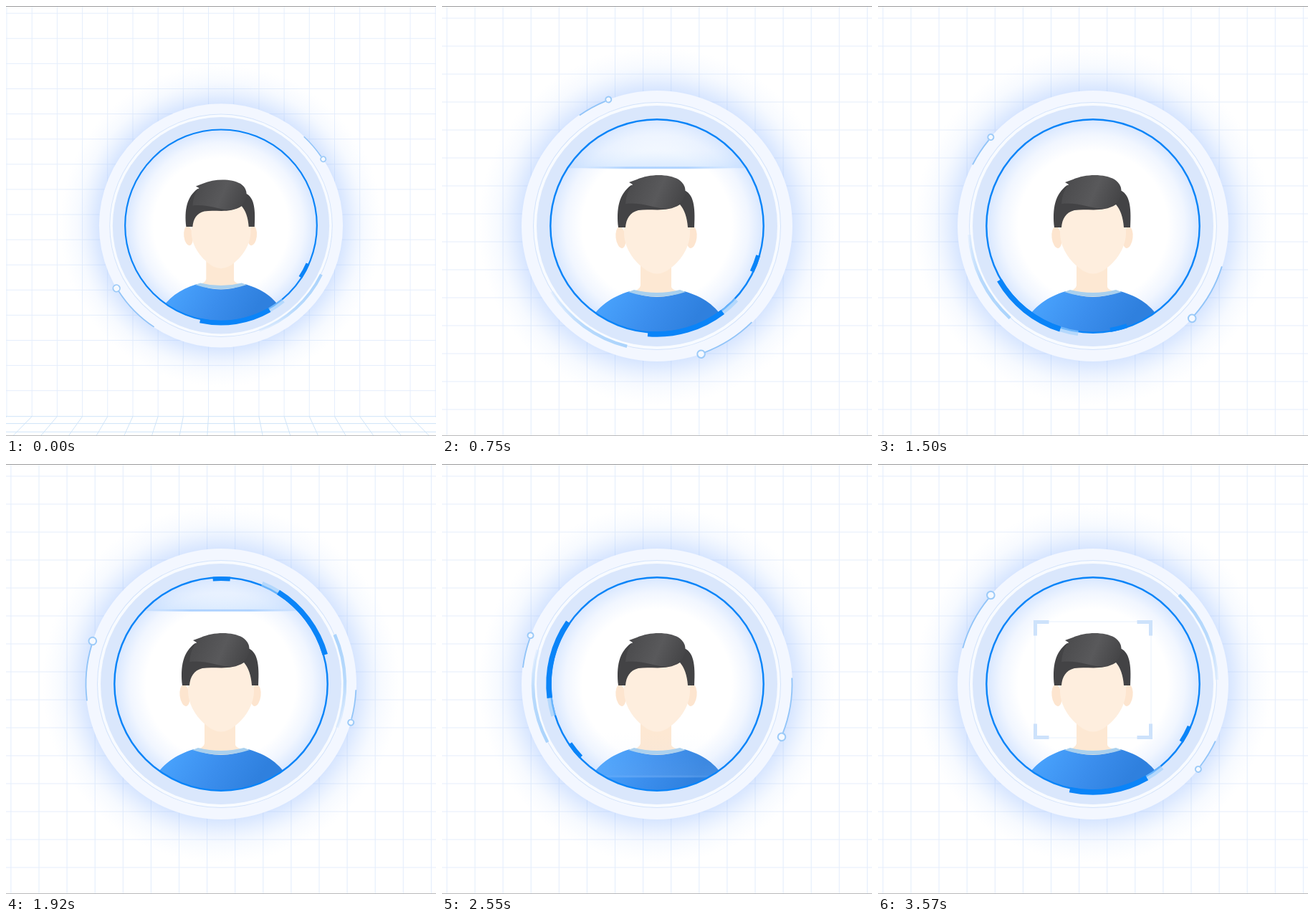
These frames come from a looping animation (600 by 600 pixels, 3600 ms). An HTML page with a canvas:

```html
<!DOCTYPE html>
<html lang="en">
<head>
<meta charset="utf-8">
<title>Face scan</title>
<style>
html, body { margin: 0; width: 100%; height: 100%; overflow: hidden; background: #fff; }
canvas { display: block; width: 600px; height: 600px; }
</style>
</head>
<body>
<canvas id="stage" width="600" height="600"></canvas>
<script>
const ctx = document.getElementById('stage').getContext('2d');
const LOOP = 3600, CX = 300, CY = 307, CELL = 39.1, FLOOR = 603;
const BLUE = '#0a84f8';
const rad = deg => deg * Math.PI / 180;
const clamp = x => Math.max(0, Math.min(1, x));

// Spin in degrees: [time, angle, degrees per ms]
const SPIN = [[0, 0, .24], [750, 282, .45], [1500, 614, .405], [1920, 769.5, .335],
  [2550, 954, .255], [2970, 1048, .197], [3570, 1152, .15], [3600, 1156.5, .15]];

function spinAt(t) {
  let i = 0;
  while (i < SPIN.length - 2 && t >= SPIN[i + 1][0]) i++;
  const [t0, a0, v0] = SPIN[i], [t1, a1, v1] = SPIN[i + 1];
  const h = t1 - t0, u = (t - t0) / h, w = 1 - u;
  return a0 * (1 + 2 * u) * w * w + v0 * h * u * w * w
    + a1 * u * u * (3 - 2 * u) - v1 * h * u * u * w;
}

function gradient(g, stops) {
  stops.forEach(([at, color]) => g.addColorStop(at, color));
  return g;
}

function disc(x, y, r, fill) {
  ctx.beginPath();
  ctx.arc(x, y, r, 0, 2 * Math.PI);
  ctx.fillStyle = fill;
  ctx.fill();
}

function arc(r, width, from, to, color) {
  ctx.beginPath();
  ctx.arc(0, 0, r, rad(from), rad(to));
  ctx.lineWidth = width;
  ctx.strokeStyle = color;
  ctx.stroke();
}

function line(x0, y0, x1, y1) {
  ctx.moveTo(x0, y0);
  ctx.lineTo(x1, y1);
}

function shape(path, fill) {
  ctx.fillStyle = fill;
  ctx.fill(new Path2D(path));
}

function drawRoom() {
  ctx.lineWidth = 1.1;
  ctx.strokeStyle = '#e5eefc';
  ctx.beginPath();
  for (let i = -3; i <= 17; i++) line(46 + i * CELL, -80, 46 + i * CELL, FLOOR);
  for (let y = FLOOR - CELL - .9; y > -80; y -= 39) line(-80, y, 680, y);
  ctx.stroke();

  ctx.strokeStyle = '#cfe4f8';
  ctx.beginPath();
  for (let i = -3; i <= 17; i++) {
    const x = 46 + i * CELL;
    line(x, FLOOR, 300 + (x - 300) * 1.2, FLOOR + 60);
  }
  [0, 11, 24, 40].forEach(d => line(-80, FLOOR + d, 680, FLOOR + d));
  ctx.stroke();
}

function drawDial() {
  disc(CX, CY, 250, gradient(ctx.createRadialGradient(CX, CY, 180, CX, CY, 250), [
    [0, 'rgba(150,188,255,.48)'], [.25, 'rgba(165,198,255,.34)'],
    [.6, 'rgba(190,215,255,.13)'], [1, 'rgba(210,228,255,0)']]));
  disc(CX, CY, 189, '#f3f7ff');
  disc(CX, CY, 173, '#d3e3fb');
  disc(CX, CY, 172, '#f8fbff');
  disc(CX, CY, 168, '#dae7fc');
  disc(CX, CY, 149, gradient(ctx.createRadialGradient(CX, CY, 0, CX, CY, 149), [
    [0, '#fff'], [.7, '#fff'], [.86, '#f1f6ff'], [1, '#d8e7ff']]));
}

function drawPerson() {
  shape('M277 350H320V392Q322 398 338 399Q300 420 262 399Q276 397 277 390Z', '#fde8d3');
  const shirt = gradient(ctx.createLinearGradient(240, 398, 340, 460),
    [[0, '#47a0fb'], [.5, '#3b8eed'], [1, '#2f80de']]);
  shape('M205 440C218 420 235 406 262 398Q300 414 338 398C365 406 382 418 395 440V470H205Z', shirt);
  shape('M260 399L268 396Q300 404 332 396L340 399Q300 412 260 399Z', '#a9d0ee');

  for (const x of [249.5, 348.5]) {
    ctx.beginPath();
    ctx.ellipse(x, 323, 7, 15, x < 300 ? -.12 : .12, 0, 2 * Math.PI);
    ctx.fillStyle = '#fde5cf';
    ctx.fill();
  }
  shape('M254 300Q254 272 300 272Q346 272 346 300V318C345 341 329 360 313 370Q300 377 287 370C271 360 255 341 254 318Z', '#feeede');

  shape('M246 309C243 283 247 262 264 250L300 255L340 258C350 264 354 277 352 309H343C342 294 338 284 332 277C313 289 292 282 274 285C262 288 257 297 256 309Z', '#434345');
  const fringe = gradient(ctx.createLinearGradient(262, 245, 340, 280),
    [[0, '#4b4b4d'], [.5, '#59595b'], [1, '#414143']]);
  shape('M261 246L272 242C290 234 316 234 330 242Q342 250 339 264Q336 276 322 281C302 287 286 273 256 276Q257 259 266 249Z', fringe);
}

function drawScan(t, start) {
  const y = 160 + (t - start) * .368;
  if (t < start || y > 458) return;
  const fade = clamp((t - start) / 90) * clamp((458 - y) / 70);
  ctx.globalAlpha = fade;
  ctx.fillStyle = gradient(ctx.createLinearGradient(0, y - 62, 0, y), [
    [0, 'rgba(205,226,255,0)'], [.6, 'rgba(205,226,255,.26)'], [1, 'rgba(180,213,255,.5)']]);
  ctx.fillRect(150, y - 62, 300, 62);
  ctx.fillStyle = gradient(ctx.createLinearGradient(195, 0, 405, 0), [
    [0, 'rgba(150,197,255,0)'], [.3, 'rgba(150,197,255,.65)'],
    [.7, 'rgba(150,197,255,.65)'], [1, 'rgba(150,197,255,0)']]);
  ctx.fillRect(195, y - 2, 210, 3);
  ctx.globalAlpha = 1;
}

function drawBrackets(alpha) {
  ctx.globalAlpha = alpha;
  ctx.strokeStyle = '#e8f1fd';
  ctx.lineWidth = 1;
  ctx.strokeRect(219, 220, 162, 162);
  ctx.strokeStyle = '#cde2fb';
  ctx.lineWidth = 5;
  ctx.beginPath();
  for (const sx of [-1, 1]) for (const sy of [-1, 1]) {
    const x = 300 + sx * 80.5, y = 301 + sy * 80.5;
    ctx.moveTo(x - sx * 19, y);
    ctx.lineTo(x, y);
    ctx.lineTo(x, y - sy * 19);
  }
  ctx.stroke();
  ctx.globalAlpha = 1;
}

function turned(angle, draw) {
  ctx.save();
  ctx.translate(CX, CY);
  ctx.rotate(rad(angle));
  draw();
  ctx.restore();
}

function drawMarker(angle, span, size) {
  turned(angle, () => {
    arc(188.5, 1.8, -span, -1.5, '#91c4f8');
    disc(189, 0, size, '#f5f9ff');
    ctx.lineWidth = 2;
    ctx.strokeStyle = '#9bcaf8';
    ctx.stroke();
  });
}

function drawSegments(spin) {
  turned(26 - spin, () => {
    const fade = gradient(ctx.createConicGradient(rad(-2), 0, 0), [
      [0, '#a9d3fc'], [.07, '#b9dafc'], [.13, 'rgba(205,228,254,.35)'], [1, 'rgba(205,228,254,0)']]);
    arc(173, 4.5, 0, 44, fade);
  });
  turned(102.4 + spin * 1.25, () => {
    arc(151, 7, -52, -42, 'rgba(160,208,252,.65)');
    arc(151, 7.5, -42.3, 0, BLUE);
    arc(147, 6, -78.7, -69.3, BLUE);
  });
  drawMarker(spin - 33, 14, 4);
  drawMarker(spin + 149, 25.6, 5.3);
}

function draw(t) {
  const zoom = 1 - .1 * (1 - clamp(t / 560)) ** 2.4;
  const spin = spinAt(t);
  ctx.fillStyle = '#fff';
  ctx.fillRect(0, 0, 600, 600);

  ctx.save();
  ctx.translate(300, 300);
  ctx.scale(zoom, zoom);
  ctx.translate(-300, -300);
  drawRoom();
  drawDial();

  ctx.save();
  ctx.beginPath();
  ctx.arc(CX, CY, 149, 0, 2 * Math.PI);
  ctx.clip();
  const brackets = clamp((t - 3300) / 240);
  if (brackets) drawBrackets(brackets);
  drawPerson();
  drawScan(t, 570);
  drawScan(t, 1798);
  ctx.restore();

  turned(0, () => arc(148.7, 2.4, 0, 360, BLUE));
  drawSegments(spin);
  ctx.restore();

  ctx.fillStyle = '#9b9b9d';
  ctx.fillRect(0, 0, 600, 1);
  ctx.fillStyle = '#b9b9bb';
  ctx.fillRect(0, 599, 600, 1);
}

const begin = performance.now();
function tick() {
  const t = (performance.now() - begin) % LOOP;
  draw(Math.floor(t / 30) * 30);
  requestAnimationFrame(tick);
}
tick();
</script>
</body>
</html>
```
